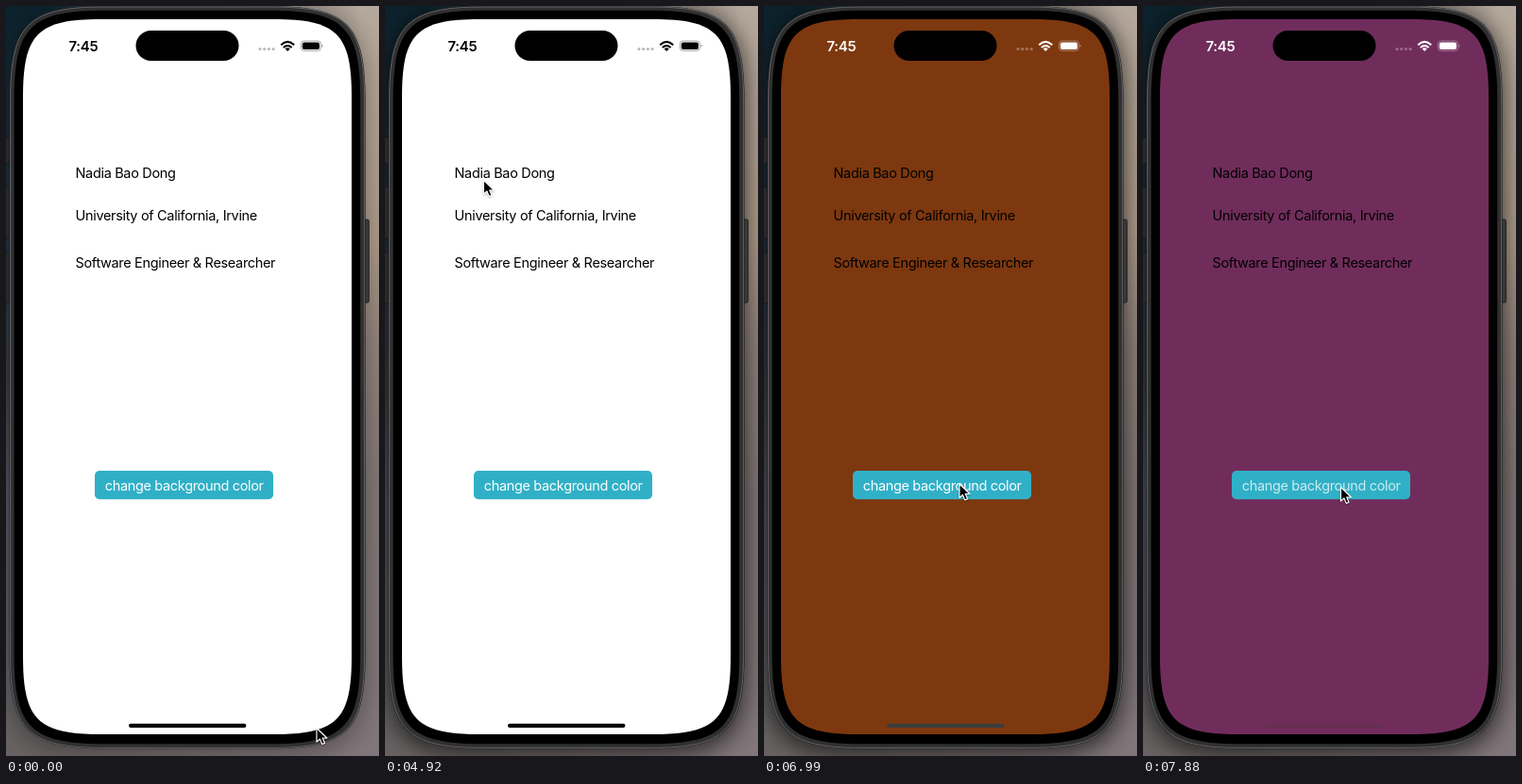
Write an HTML page that moves like this. It is 395 px wide and 794 px high and loops after 8000 ms.

```html
<!DOCTYPE html>
<html lang="en">
<head>
<meta charset="utf-8">
<title>Background color button</title>
<style>
  html, body { margin: 0; width: 100%; height: 100%; overflow: hidden; background: #333; }
  svg { display: block; width: 100%; height: 100%; }
  text { font-family: Inter, Roboto, sans-serif; font-size: 14.5px; letter-spacing: -.33px; }
  .clock { font-size: 15px; font-weight: 600; letter-spacing: -.3px; }
</style>
</head>
<body>
<svg viewBox="0 0 395 794" preserveAspectRatio="none">
  <defs>
    <linearGradient id="left" x2="0" y2="1">
      <stop offset="0" stop-color="#0c222c"/>
      <stop offset=".35" stop-color="#263444"/>
      <stop offset=".5" stop-color="#3a3c40"/>
      <stop offset=".65" stop-color="#50545f"/>
      <stop offset="1" stop-color="#686362"/>
    </linearGradient>
    <linearGradient id="right" x2="0" y2="1">
      <stop offset="0" stop-color="#b5a89c"/>
      <stop offset=".3" stop-color="#ad9b8a"/>
      <stop offset=".45" stop-color="#91827b"/>
      <stop offset=".65" stop-color="#817776"/>
      <stop offset="1" stop-color="#81767a"/>
    </linearGradient>
    <linearGradient id="fade">
      <stop offset=".1" stop-color="#fff" stop-opacity="0"/>
      <stop offset=".95" stop-color="#fff"/>
    </linearGradient>
    <mask id="blend"><rect width="395" height="794" fill="url(#fade)"/></mask>
    <filter id="blur" x="-20%" y="-20%" width="140%" height="140%"><feGaussianBlur stdDeviation="12"/></filter>
    <filter id="soft" x="-50%" y="-50%" width="200%" height="200%">
      <feDropShadow dx="0" dy="1" stdDeviation=".8" flood-opacity=".35"/>
    </filter>
  </defs>

  <rect width="395" height="794" fill="url(#left)"/>
  <rect width="395" height="794" fill="url(#right)" mask="url(#blend)"/>
  <path id="shadow" filter="url(#blur)"/>

  <g fill="#29292b" stroke="#111" stroke-width=".7">
    <rect x="-3" y="139" width="7" height="28" rx="1"/>
    <rect x="-3" y="192" width="7" height="54" rx="1"/>
    <rect x="-3" y="261" width="7" height="54" rx="1"/>
    <rect x="379" y="226" width="5.4" height="88" rx="1.5" fill="#39393a"/>
  </g>
  <path id="rim" fill="#151516"/>
  <path id="frame" fill="#303031" stroke="#6c6c6d" stroke-width=".9"/>
  <path id="bezel"/>
  <path id="screen"/>

  <rect x="137.5" y="26" width="109" height="32" rx="16"/>
  <g id="status">
    <text class="clock" x="66.5" y="47.8">7:45</text>
    <g id="dots">
      <circle cx="269" cy="45.5" r="1.6"/><circle cx="273.7" cy="45.5" r="1.6"/>
      <circle cx="278.4" cy="45.5" r="1.6"/><circle cx="283.1" cy="45.5" r="1.6"/>
    </g>
    <g fill="none" stroke="currentColor" stroke-width="2.1">
      <path d="M291.2 41.2Q298.2 34.7 305.2 41.2"/>
      <path d="M293.8 44Q298.2 40 302.6 44"/>
    </g>
    <path d="M295.6 45.2Q298.2 43.2 300.8 45.2L298.2 47.9Z"/>
    <rect x="312.4" y="37" width="21" height="10.4" rx="3.2" fill="none" stroke="currentColor" stroke-opacity=".4" stroke-width=".9"/>
    <rect x="313.8" y="38.4" width="18.2" height="7.6" rx="2"/>
    <path d="M334.6 40.6Q336.8 42.2 334.6 43.8Z" opacity=".45"/>
  </g>

  <text x="73.5" y="182">Nadia Bao Dong</text>
  <text x="73.5" y="227">University of California, Irvine</text>
  <text x="73.5" y="277">Software Engineer &amp; Researcher</text>

  <rect x="94" y="492" width="189" height="30.3" rx="5" fill="#30b0c7"/>
  <text id="label" x="104.7" y="512.7" fill="#fff">change background color</text>
  <rect id="home" x="130" y="759.7" width="124.4" height="4.3" rx="2.15"/>

  <g id="cursor" filter="url(#soft)">
    <path d="M.5 .5V15.2L3.9 12L6.3 17.4L9 16.2L6.7 11H11.4Z" stroke="#fff" stroke-width="1.1" stroke-linejoin="round"/>
  </g>
</svg>
<script>
  const LOOP = 8000, MOVE_START = 2390, TICK = 148.4;
  const FOCUS = 3580, FIRST_TAP = 6990, SECOND_TAP = 7580, PRESS = 7880;

  // Held pointer poses: start time, x, y
  const exitPath = [[0, 328.5, 764], [300, 328, 764], [600, 329.5, 764], [900, 182, 678], [1050, 13, 581]];
  const EXIT_END = 1190;

  // Pointer waypoints: tick, x, y
  const route = [
    [0, 70, 655], [2, 190, 525], [4, 280, 479], [6, 200, 509], [7, 198, 511], [11, 198, 511],
    [13, 145, 340], [15, 69, 178], [17, 104, 184], [20, 178, 186], [21, 100, 221], [23, 224, 229],
    [24, 110, 270], [26, 255, 282], [28, 225, 425], [30, 204, 502], [32, 209, 509], [40, 209, 509]
  ];

  const el = id => document.getElementById(id);
  const set = (id, attrs) => {
    for (const name in attrs) el(id).setAttribute(name, attrs[name]);
  };

  // Rectangle whose corners ease into the sides instead of being plain arcs
  function smoothRect(x, y, w, h, r) {
    const e = 1.5 * r, c = .28 * r, R = x + w, B = y + h;
    return `M${x + e} ${y}H${R - e}C${R - c} ${y} ${R} ${y + c} ${R} ${y + e}` +
      `V${B - e}C${R} ${B - c} ${R - c} ${B} ${R - e} ${B}` +
      `H${x + e}C${x + c} ${B} ${x} ${B - c} ${x} ${B - e}` +
      `V${y + e}C${x} ${y + c} ${x + c} ${y} ${x + e} ${y}Z`;
  }

  set('shadow', { d: smoothRect(3, 4, 379, 788, 66) });
  set('rim', { d: smoothRect(3.6, .2, 377, 786, 67) });
  set('frame', { d: smoothRect(4.6, 1, 375, 784.4, 66) });
  set('bezel', { d: smoothRect(8.6, 4.8, 366.6, 776.4, 63) });
  set('screen', { d: smoothRect(18, 14, 348, 757, 55) });

  function pointer(t) {
    if (t < EXIT_END) return exitPath.filter(p => p[0] <= t).pop().slice(1);
    if (t < MOVE_START) return null;
    const tick = Math.floor((t - MOVE_START) / TICK + .04);
    const i = route.findIndex(p => p[0] > tick);
    const [a, ax, ay] = route[i - 1], [b, bx, by] = route[i];
    const k = (tick - a) / (b - a);
    return [ax + (bx - ax) * k, ay + (by - ay) * k];
  }

  function theme(t) {
    if (t < FIRST_TAP) return { screen: '#fff', ink: '#000', dots: .28, home: '#000' };
    if (t < SECOND_TAP) return { screen: '#7e380f', ink: '#fff', dots: .3, home: '#3c3c3c' };
    return { screen: '#702d5c', ink: '#fff', dots: .3, home: '#652f52' };
  }

  function draw(t) {
    const look = theme(t), pos = pointer(t);
    set('screen', { fill: look.screen });
    set('status', { fill: look.ink, color: look.ink });
    set('dots', { opacity: look.dots });
    set('home', { fill: look.home });
    set('label', { 'fill-opacity': t >= PRESS ? .75 : 1 });
    set('shadow', { opacity: t >= FOCUS ? .65 : .3 });
    set('cursor', { visibility: pos ? 'visible' : 'hidden' });
    if (pos) set('cursor', { transform: `translate(${pos})` });
  }

  const start = performance.now();
  function frame() {
    draw((performance.now() - start) % LOOP);
    requestAnimationFrame(frame);
  }
  frame();
</script>
</body>
</html>
```
